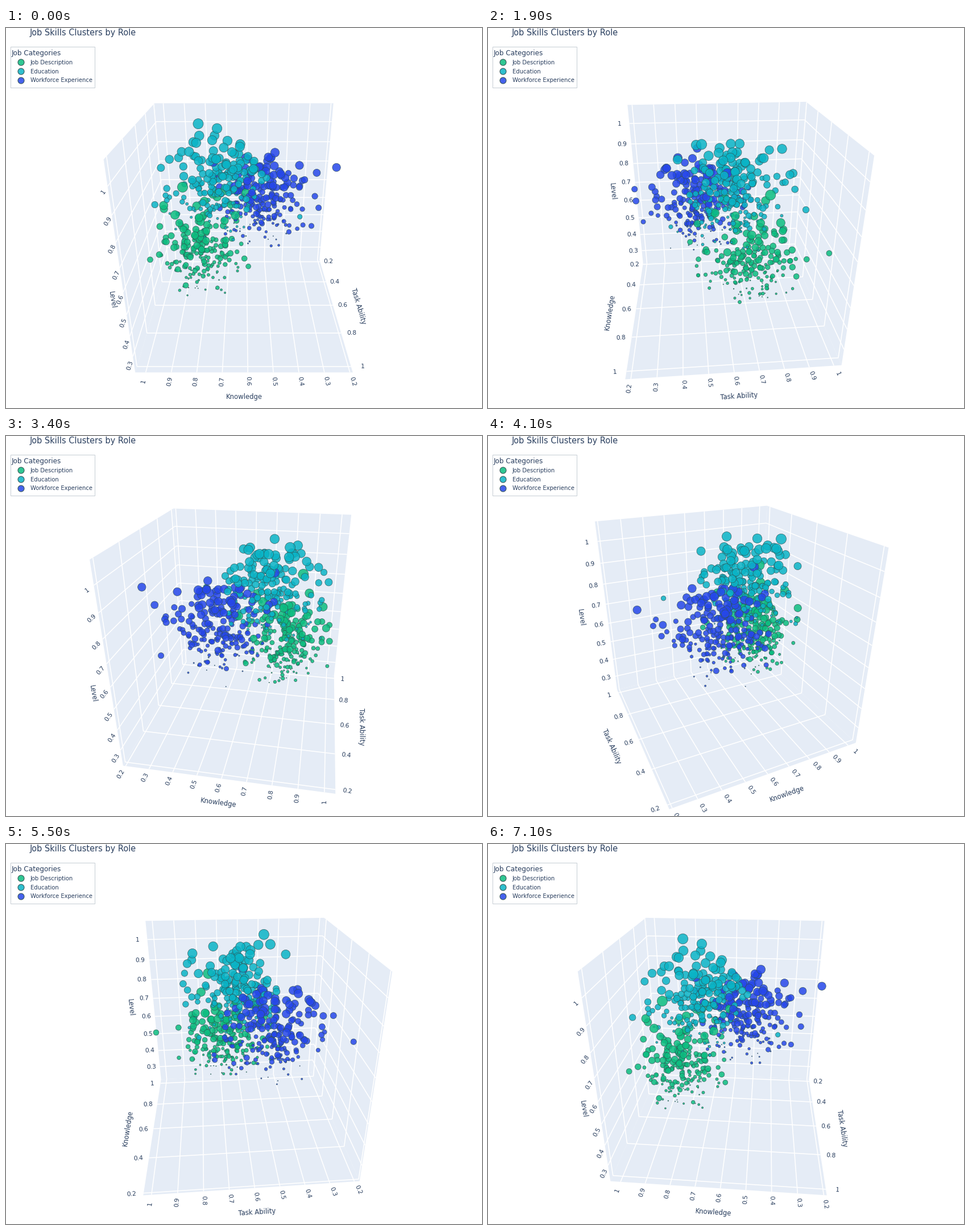
These frames come from a looping animation (837 by 669 pixels, 7200 ms). A matplotlib script:

```python
import math

import matplotlib.pyplot as plt
import numpy as np
from matplotlib.animation import FuncAnimation
from matplotlib.collections import LineCollection, PolyCollection
from matplotlib.patches import Rectangle

W, H, DPI = 837, 669, 96
PT = 72 / DPI               # points per pixel
FRAMES, STEP_MS = 72, 100
INK, WALL, EDGE = "#2a3f5f", "#e5ecf6", "#2f4f4f"

# Camera: orbit radius 2 at height 1, looking at the middle of the box
CENTER = (418.5, 346.3)
FOCAL = 775
DIST = math.sqrt(5)
COS, SIN = 2 / DIST, 1 / DIST

# Box half sizes and the data value in the middle of each axis
HALF = np.array([0.498, 0.498, 0.508])
MID = np.array([0.615, 0.605, 0.6527])
UNIT = 1.1685
NAMES = ["Knowledge", "Task Ability", "Level"]
TICK_GAP, TITLE_GAP = 0.053, 0.14

# name, colour, mean, spread, lowest z, highest z, largest diameter,
# then the outstanding points in box coordinates
CLUSTERS = [
    ("Job Description", "#0cbd80", (0.205, 0.09, -0.105), (0.09, 0.11, 0.115),
     -0.28, 0.271, 18,
     [(0.274, 0.167, 0.271), (0.384, 0.074, 0.14), (0.243, 0.467, -0.05),
      (0.405, -0.03, 0.074), (0.428, 0.0, -0.01)]),
    ("Education", "#0ab4c6", (0.12, 0.01, 0.215), (0.105, 0.115, 0.11),
     -0.02, 0.485, 18,
     [(0.221, -0.12, 0.485), (0.132, -0.141, 0.457), (0.216, -0.092, 0.434),
      (0.398, -0.01, 0.30), (0.216, 0.273, 0.345), (-0.25, 0.22, 0.15)]),
    ("Workforce Experience", "#2647ea", (-0.105, -0.125, 0.085),
     (0.105, 0.115, 0.105), -0.15, 0.33, 16,
     [(-0.468, -0.125, 0.262), (-0.383, -0.198, 0.207),
      (-0.162, -0.23, 0.307), (0.147, -0.007, 0.33),
      (-0.263, -0.474, 0.105), (-0.03, -0.442, 0.135)]),
]


def make_points(count=195):
    rng = np.random.default_rng(12)
    points, sizes, colors = [], [], []
    for _, color, mean, spread, low, high, biggest, special in CLUSTERS:
        p = np.array(mean) + np.clip(rng.normal(size=(count, 3)), -2.5, 2.5) * spread
        p[:, 2] = np.minimum(low + np.abs(p[:, 2] - low), high - 0.06)
        p = np.vstack([p, special])
        rise = np.clip((p[:, 2] - low) / (high - low), 0, 1)
        points.append(p)
        sizes.append(np.maximum(biggest * rise ** 0.7, 1.2))
        colors += [color] * len(p)
    return np.vstack(points), np.concatenate(sizes), np.array(colors)


def project(points, angle):
    """Screen position and depth of points in box coordinates."""
    x, y, z = np.asarray(points, float).T
    c, s = math.cos(angle), math.sin(angle)
    near, side = x * c + y * s, y * c - x * s
    depth = DIST - near * COS - z * SIN
    scale = FOCAL / depth
    screen = np.column_stack([CENTER[0] + side * scale,
                              CENTER[1] - (z * COS - near * SIN) * scale])
    return screen, depth


def text_angle(a, b):
    """Direction from a to b, folded so the text never stands on its head."""
    deg = math.degrees(math.atan2(a[1] - b[1], b[0] - a[0]))
    if deg > 90:
        deg -= 180
    elif deg <= -90:
        deg += 180
    return deg


def axis_places(angle):
    """For each axis: its edge (own component zero) and outward direction."""
    sx, sy = np.sign([math.cos(angle), math.sin(angle)])
    floor = -HALF[2]
    x_axis = (np.array([0, sy * HALF[1], floor]), np.array([0, sy, 0]))
    y_axis = (np.array([sx * HALF[0], 0, floor]), np.array([sx, 0, 0]))
    corners = [(np.array([sx * HALF[0], -sy * HALF[1], 0]), np.array([sx, 0, 0])),
               (np.array([-sx * HALF[0], sy * HALF[1], 0]), np.array([0, sy, 0]))]
    z_axis = min(corners, key=lambda e: project([e[0]], angle)[0][0, 0])
    return [x_axis, y_axis, z_axis], np.array([-sx, -sy, -1])


def axis_ticks(axis, edge, angle):
    ends = np.array([edge, edge])
    ends[:, axis] = -HALF[axis], HALF[axis]
    a, b = project(ends, angle)[0]
    per_unit = 10 if np.hypot(*(b - a)) > 250 else 5
    reach = HALF[axis] / UNIT
    first = math.ceil((MID[axis] - reach) * per_unit)
    last = math.floor((MID[axis] + reach) * per_unit)
    return [n / per_unit for n in range(first, last + 1)]


fig = plt.figure(figsize=(W / DPI, H / DPI), dpi=DPI, facecolor="white")
ax = fig.add_axes([0, 0, 1, 1])
ax.set_xlim(0, W)
ax.set_ylim(H, 0)
ax.axis("off")


def put_text(x, y, text, size, **kw):
    return ax.text(x, y, text, fontsize=size * PT, color=INK,
                   family="DejaVu Sans", **kw)


def draw_legend():
    put_text(41.5, 12.5, "Job Skills Clusters by Role", 14.5, va="baseline")
    ax.add_patch(Rectangle((8.5, 32.5), 148, 72, fc="white", ec="#c6cdd4",
                           lw=PT))
    put_text(10, 48, "Job Categories", 12, va="baseline")
    for row, cluster in enumerate(CLUSTERS):
        y = 60 + 15.8 * row
        ax.scatter([26], [y], s=(11 * PT) ** 2, c=cluster[1], alpha=0.85,
                   edgecolors=EDGE, linewidths=1.2 * PT)
        put_text(43, y + 3.8, cluster[0], 10, va="baseline")


draw_legend()
points, sizes, colors = make_points()
walls = ax.add_collection(PolyCollection([], facecolors=WALL, edgecolors="none",
                                         zorder=1))
grid = ax.add_collection(LineCollection([], colors="white", linewidths=1.6 * PT,
                                        zorder=2))
dots = ax.scatter(points[:, 0], points[:, 1], s=sizes, alpha=0.85,
                  edgecolors=EDGE, linewidths=0.7 * PT, zorder=3)
centered = dict(ha="center", va="center", zorder=4)
tick_texts = [[put_text(0, 0, "", 10.7, **centered) for _ in range(10)]
              for _ in range(3)]
titles = [put_text(0, 0, name, 11.6, **centered) for name in NAMES]


def place(label, spot, angle_deg):
    label.set_position(spot)
    label.set_rotation(angle_deg)


def update(frame):
    # A hair past each quarter turn, so that the left wall is the one shown
    angle = math.radians(90 - 5 * frame + 0.001)
    places, back = axis_places(angle)
    ticks = [axis_ticks(i, places[i][0], angle) for i in range(3)]

    faces, lines = [], []
    for normal in range(3):
        u, v = [i for i in range(3) if i != normal]
        quad = np.tile(back * HALF, (4, 1))
        quad[:, u] = np.array([-1, 1, 1, -1]) * HALF[u]
        quad[:, v] = np.array([-1, -1, 1, 1]) * HALF[v]
        faces.append(project(quad, angle)[0])
        for fixed, along in ((u, v), (v, u)):
            for value in ticks[fixed]:
                line = np.tile(back * HALF, (2, 1))
                line[:, fixed] = (value - MID[fixed]) * UNIT
                line[:, along] = -HALF[along], HALF[along]
                lines.append(project(line, angle)[0])
    walls.set_verts(faces)
    grid.set_segments(lines)

    for i, (edge, out) in enumerate(places):
        for label in tick_texts[i]:
            label.set_text("")
        for label, value in zip(tick_texts[i], ticks[i]):
            base = edge.copy()
            base[i] = (value - MID[i]) * UNIT
            a, b = project([base, base + out * TICK_GAP], angle)[0]
            label.set_text(f"{value:g}")
            place(label, b, text_angle(a, b))
        spot = edge + out * TITLE_GAP
        along = np.eye(3)[i] * 0.1
        a, mid, b = project([edge - along, spot, edge + along], angle)[0]
        place(titles[i], mid, text_angle(a, b))

    screen, depth = project(points, angle)
    order = np.argsort(-depth)
    dots.set_offsets(screen[order])
    dots.set_sizes((sizes[order] * PT) ** 2)
    dots.set_facecolor(colors[order])
    return []


anim = FuncAnimation(fig, update, frames=FRAMES, interval=STEP_MS,
                     repeat=True, repeat_delay=0, blit=False)
plt.show()
```
